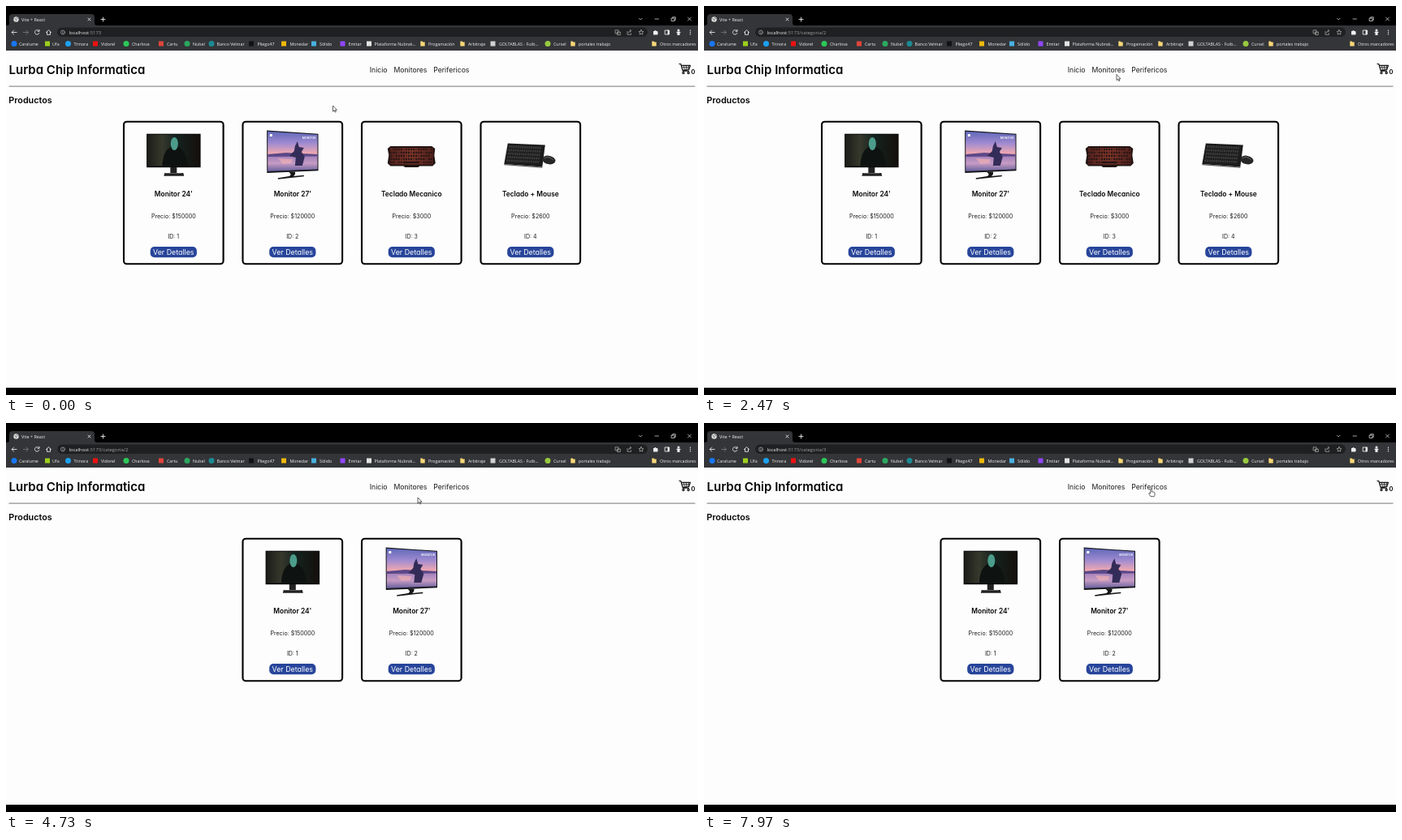
An HTML page that plays this animation: 852 px wide and 480 px high, repeating every 8 s.

```html
<!DOCTYPE html>
<html lang="es">
<head>
<meta charset="utf-8">
<title>Tienda</title>
<style>
  html, body { margin: 0; width: 100%; height: 100%; overflow: hidden; background: #000; }
  svg { display: block; width: 100%; height: 100%; }
  .page { font-family: Inter, "Open Sans", sans-serif; font-feature-settings: "cv11"; fill: #1c1c1c; }
  .bold { font-weight: 600; fill: #050505; }
  .mid { text-anchor: middle; }
  .chrome { font-family: "Open Sans", "Noto Sans", sans-serif; font-size: 5.4px; fill: #f0f0f0; }
  .line { fill: none; stroke: #e8e8e8; stroke-width: .9; stroke-linecap: round; stroke-linejoin: round; }
</style>
</head>
<body>
<svg viewBox="0 0 852 480">
  <defs>
    <linearGradient id="cave" x2="1">
      <stop offset="0" stop-color="#1b1c18"/><stop offset=".28" stop-color="#37382c"/>
      <stop offset=".55" stop-color="#14231f"/><stop offset="1" stop-color="#150f0c"/>
    </linearGradient>
    <linearGradient id="dusk" x2="0" y2="1">
      <stop offset="0" stop-color="#5f68b8"/><stop offset=".3" stop-color="#a08bd0"/>
      <stop offset=".55" stop-color="#f0a8b0"/><stop offset=".64" stop-color="#a684bc"/>
      <stop offset=".8" stop-color="#c79cc4"/><stop offset="1" stop-color="#66609c"/>
    </linearGradient>
    <linearGradient id="glow" x2="1">
      <stop offset="0" stop-color="#5a2420"/><stop offset=".5" stop-color="#8a3a2c"/>
      <stop offset="1" stop-color="#55221e"/>
    </linearGradient>
  </defs>

  <rect width="852" height="480"/>
  <rect y="55" width="852" height="416" fill="#fdfdfe"/>

  <!-- Browser -->
  <path d="M0 55V24H2Q4 24 4 21V14Q4 10 8 10H105Q109 10 109 14V21Q109 24 112 24H852V55Z" fill="#343538"/>
  <rect x="63" y="26.5" width="727" height="11.5" rx="5.7" fill="#1f2022"/>
  <g class="chrome">
    <circle cx="12.5" cy="16.5" r="3.2" fill="#dedede"/>
    <path d="M10.5 15.5L13 16.5L12 18.5M13 14L15 16" fill="none" stroke="#565656" stroke-width=".8"/>
    <text x="19" y="18.5">Vite + React</text>
    <g class="line">
      <path d="M101 15l3 3m0-3l-3 3M117 16.5h5m-2.5-2.5v5"/>
      <path d="M779.5 15.2l1.8 1.8 1.8-1.8M799 16h4.5" stroke-width=".7"/>
      <path d="M819.5 15h3.5v3.5h-3.5zM820.7 15v-1.3h3.6v3.6h-1.2M839.5 14l4 4m0-4l-4 4" stroke-width=".7"/>
      <path d="M13 32.5H7.2m2.4-2.5l-2.5 2.5 2.5 2.5"/>
      <path d="M21.5 32.5h5.8m-2.4-2.5l2.5 2.5-2.5 2.5" stroke="#777"/>
      <path d="M40.5 30.7a2.8 2.8 0 1 0 .3 2.8M41 29.3v2h-2"/>
      <path d="M49.5 32.5l3-2.8 3 2.8M50.5 32v3.3h4V32"/>
      <g stroke="#b5b5b5" stroke-width=".7">
        <circle cx="70" cy="32.5" r="2.5"/><path d="M70 32.3v1.4m0-2.8v.1"/>
        <path d="M750.5 29.8h3.5v4h-3.5zM753 32h3.3v3.6H753z"/>
        <path d="M765 31.5v3.8h4.5v-1.5M766.5 33q.4-2.5 3-2.5m-1.2-1.4l1.5 1.4-1.5 1.4"/>
        <path d="M782 29.4l.9 2 2.1.2-1.6 1.5.5 2.1-1.9-1.1-1.9 1.1.5-2.1-1.6-1.5 2.1-.2z"/>
      </g>
      <path d="M811.6 30h5v5h-5zM815 30v5"/>
    </g>
    <path d="M797 31h1.5a1 1 0 0 1 2 0h1.8v1.7a1 1 0 0 1 0 1.8v1H797z"/>
    <rect x="815" y="30" width="1.6" height="5"/>
    <path d="M825 32.2Q828 30.6 831 32.2L829.5 33.2V36H826.5V33.2Z"/><circle cx="828" cy="30" r="1.5"/>
    <g><circle cx="842.5" cy="30.3" r=".7"/><circle cx="842.5" cy="32.5" r=".7"/><circle cx="842.5" cy="34.7" r=".7"/></g>
    <text x="77.5" y="34.5" font-size="5.9">localhost<tspan id="path" fill="#a0a0a0">:5173</tspan></text>
    <g id="marks"></g>
  </g>

  <!-- Shop -->
  <g class="page">
    <text class="bold" x="3.5" y="83.5" font-size="15">Lurba Chip Informatica</text>
    <g font-size="8.7">
      <text x="447.7" y="81.5">Inicio</text>
      <text x="477.4" y="81.5">Monitores</text>
      <text x="526.2" y="81.5">Perifericos</text>
    </g>
    <g fill="none" stroke="#111" stroke-width="1.2" stroke-linejoin="round">
      <path d="M828.5 71.5h2.3l2.5 8.7h7.7M831.3 73.3h11.2l-1.7 5.2-8 .8"/>
      <path d="M831.8 75.8h9.8M834.5 73.5l.8 5.2m2.2-5.2v5.2m2.9-5.2l-.8 5" stroke-width=".8"/>
      <circle cx="834" cy="82.5" r="1.1"/><circle cx="840.2" cy="82.5" r="1.1"/>
    </g>
    <text class="bold" x="843.5" y="84" font-size="7.4">0</text>
    <rect x="3.5" y="98.6" width="845" height="1" fill="#777"/>
    <text class="bold" x="3.3" y="120" font-size="10.8">Productos</text>
    <g id="monitors"></g>
    <g id="extras"></g>
  </g>

  <g id="arrow" fill="#fff" stroke="#222" stroke-width=".7" stroke-linejoin="round">
    <path d="M0 0V7.2L1.7 5.7L2.8 8.1L3.9 7.6L2.8 5.3H5Z"/>
  </g>
  <g id="hand" fill="#fff" stroke="#222" stroke-width=".7" stroke-linejoin="round">
    <path d="M-.8 6V.8Q0-.5.8.8V4Q1.6 3.4 2.2 4.2Q3 3.7 3.5 4.6Q4.5 4.3 4.5 5.5V7.4Q4.5 8.4 3.7 9.7H-.6Q-1.4 8-2.9 6.2Q-2.7 4.9-1.5 5.5Z"/>
  </g>
</svg>

<script>
const LOOP = 8000;
const GAP = 146.5;
const URL_TIMES = [1150, 6600];
const CARDS_TIME = 3150;
const $ = id => document.getElementById(id);
const rect = (x, y, w, h, fill, extra = "") =>
  `<rect x="${x}" y="${y}" width="${w}" height="${h}" fill="${fill}" ${extra}/>`;

// Bookmarks: icon centre, text start, label, icon colour, icon kind
const marks = [
  [10, 16, "Caralume", "#1877f2", "dot"], [51, 57, "Ufa", "#9cd01c", "box"],
  [76.5, 83.5, "Trinora", "#1da1f2", "dot"], [110, 117, "Vidorel", "#f01010", "box"],
  [148, 155, "Charlova", "#2cc858", "dot"], [191, 198, "Cartu", "#e0453a", "box"],
  [223, 230, "Nubel", "#2ca860", "dot"], [253, 259.5, "Banco Velmar", "#1c8a94", "dot"],
  [302, 309.5, "Pliego47", "#111116", "box"], [342, 349.5, "Monedar", "#f0b90b", "box"],
  [379, 386, "Sólido", "#48b0e0", "box"], [414.5, 421.5, "Emitar", "#9146ff", "box"],
  [447, 453.5, "Plataforma Nubrak...", "#e4e4e4", "box"],
  [513, 520, "Progamación", "#f8d878", "folder"], [562, 569, "Arbitraje", "#f8d878", "folder"],
  [599.5, 607, "GOLTABLAS - Futb...", "#d2d2d2", "box"], [667, 674, "Cursel", "#98ca3f", "dot"],
  [698, 705, "portales trabajo", "#f8d878", "folder"], [798, 805, "Otros marcadores", "#f8d878", "folder"]
];
const icons = {
  dot: (x, c) => `<circle cx="${x}" cy="46.5" r="3.5" fill="${c}"/>`,
  box: (x, c) => rect(x - 3, 43.5, 6, 6, c),
  folder: (x, c) => `<path d="M${x - 2.7} 43.5h2.3l.8 1h2.3v5h-5.4z" fill="${c}"/>`
};
$("marks").innerHTML = marks.map(([x, tx, label, color, kind]) =>
  icons[kind](x, color) + `<text x="${tx}" y="48.5" font-size="5.3">${label}</text>`).join("");

// Product pictures, drawn around the card centre
function keys(cols, rows, w, h, fill) {
  let out = "";
  for (let r = 0; r < rows; r++)
    for (let c = 0; c < cols; c++)
      out += rect(c * w, r * h, w * .72, h * .66, fill(c, r));
  return out;
}
const pictures = [
  rect(-33.2, 157.7, 66.5, 41.5, "#080808") + rect(-32.2, 158.7, 64.5, 38.8, "url(#cave)") +
  `<path d="M-14 197.5Q-13 180-5 175L0 170L6 174Q15 178 18 197.5Z" fill="#0e1210"/>
   <ellipse cx="1" cy="170" rx="4.5" ry="8" fill="#4c9c8c"/>
   <path d="M-4 199h8v7h8l1 3.8h-25l1-3.8h7z" fill="#222"/>
   <path d="M-10 206.5h20" stroke="#777" stroke-width=".7"/>`,

  `<path d="M-31.7 153.5L31.7 157.8V203.2L-31.5 206Z" fill="#141418"/>
   <path d="M-30.7 154.7L30.7 158.7V201.4L-30.5 204Z" fill="url(#dusk)"/>
   <path d="M-30.5 183L-8 181L30.7 183V185.5L-30.5 186Z" fill="#5c4888"/>
   <path d="M-4 185L2 179L3 173L6 167L8 174L14 175L11 180L15 186L12 197H3L4 187Z" fill="#342c58"/>
   <path d="M-18 188L0 189L-2 194L-12 195Z" fill="#f6b4b0" opacity=".6"/>
   ${rect(-28, 158, 3, 3, "#fff")}
   <text x="12" y="164" font-size="3.5" font-weight="600" fill="#fff">MONITOR</text>
   <path d="M-5 204.8L3 204.4Q4 208 1 210L14 208.8V210.2L-18 213.8V212.3L-4 210Q0 208-5 204.8Z" fill="#161618"/>`,

  `<path d="M-29.5 176L-26 173H25L29 176L28 184L29.5 194L26 197.5H10L8 199H-8L-10 197.5H-26L-29.5 194L-28 184Z" fill="#1f1210"/>
   ${rect(-26.5, 175, 53, 20.5, "url(#glow)")}
   <g transform="translate(-26 175.6)">${keys(17, 5, 3.08, 4, (c, r) => (c * 3 + r) % 5 ? "#2b1614" : "#54231d")}</g>
   ${rect(-9, 191.8, 17, 2.4, "#251514")}`,

  `<path d="M-28 169.5L18 171.5L14.5 198.5L-32.5 195Z" fill="#1c1c1c"/>
   <g transform="matrix(.98 .045 -.15 1 -26.5 172)">${keys(15, 5, 2.75, 4.3, () => "#3b3b3b")}</g>
   <path d="M-32.5 195L14.5 198.5V199.7L-32.3 196.2Z" fill="#555"/>
   <ellipse cx="22.5" cy="190" rx="8.2" ry="5.2" transform="rotate(12 22.5 190)" fill="#262626"/>
   <path d="M17 188Q22 184 28 190" fill="none" stroke="#777" stroke-width=".8"/>`
];

const products = [["Monitor 24'", 150000], ["Monitor 27'", 120000], ["Teclado Mecanico", 3000], ["Teclado + Mouse", 2600]];
const card = ([name, price], i) => `
  <g transform="translate(${206.3 + GAP * i} 0)">
    ${rect(-61.3, 142.7, 122.6, 175.6, "#fdfdfe", 'rx="3.8" stroke="#000" stroke-width="2.1"')}
    ${pictures[i]}
    <g class="mid">
      <text class="bold" y="234.5" font-size="8.4">${name}</text>
      <text y="261.5" font-size="7.1">Precio: $${price}</text>
      <text y="287" font-size="7">ID: ${i + 1}</text>
      ${rect(-28.6, 297, 57.2, 13.2, "#27459a", 'rx="5"')}
      <text y="306.7" font-size="8.85" fill="#fff">Ver Detalles</text>
    </g>
  </g>`;
const cards = products.map(card);
$("monitors").innerHTML = cards.slice(0, 2).join("");
$("extras").innerHTML = cards.slice(2).join("");

// Pointer path: time, x, y, shape from that time on
const moves = [
  [0, 402.5, 123, "arrow"], [60, 402.5, 123, "arrow"], [360, 457, 84, "hand"],
  [470, 459, 82, "hand"], [700, 459, 82, "hand"], [1000, 504, 82, "hand"],
  [1700, 504, 82, "hand"], [1870, 508, 84.5, "arrow"], [2900, 508, 84.5, "arrow"],
  [3200, 511, 84.5, "hand"], [4000, 511, 84.5, "hand"], [4300, 507, 92, "arrow"],
  [4950, 507, 92, "arrow"], [5350, 543, 81, "hand"], [5900, 543, 81, "hand"],
  [6300, 550.5, 81, "hand"], [LOOP, 550.5, 81, "hand"]
];

function pointer(t) {
  const n = moves.findIndex(m => m[0] > t);
  const [t0, x0, y0, shape] = moves[n - 1];
  const [t1, x1, y1] = moves[n];
  const p = (t - t0) / (t1 - t0);
  const e = p * p * (3 - 2 * p);
  return { x: x0 + (x1 - x0) * e, y: y0 + (y1 - y0) * e, shape };
}

function draw(t) {
  $("path").textContent = t < URL_TIMES[0] ? ":5173" : ":5173/categoria/" + (t < URL_TIMES[1] ? 2 : 3);
  const filtered = t >= CARDS_TIME;
  $("monitors").setAttribute("transform", `translate(${filtered ? GAP : 0} 0)`);
  $("extras").style.display = filtered ? "none" : "";
  const { x, y, shape } = pointer(t);
  for (const id of ["arrow", "hand"]) {
    $(id).setAttribute("transform", `translate(${x} ${y})`);
    $(id).style.display = id === shape ? "" : "none";
  }
}

const start = performance.now();
function tick() {
  draw((performance.now() - start) % LOOP);
  requestAnimationFrame(tick);
}
tick();
</script>
</body>
</html>
```
